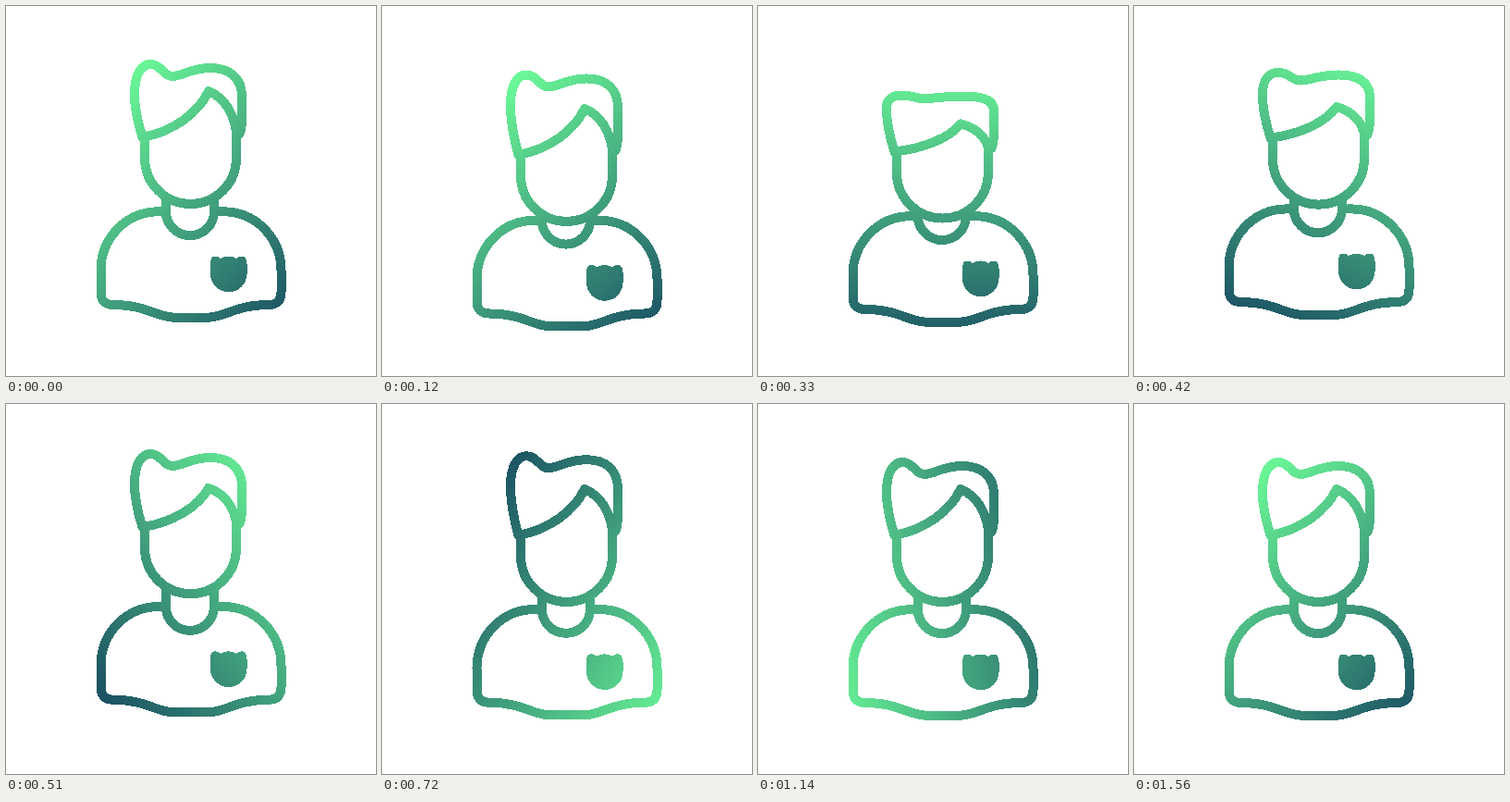
Recreate the animation shown at these times as an HTML page. Size 400 by 400 pixels, loop 3800 ms.

```html
<!DOCTYPE html>
<html lang="en">
<head>
<meta charset="utf-8">
<title>Player icon</title>
<style>
  html, body { margin: 0; width: 100%; height: 100%; overflow: hidden; background: #fff; }
  svg { display: block; width: 100vw; height: 100vh; shape-rendering: crispEdges; }
  .line { fill: none; stroke: url(#tint); stroke-width: 10; stroke-linecap: round; stroke-linejoin: round; }
</style>
</head>
<body>
<svg viewBox="0 0 400 400">
  <defs>
    <linearGradient id="tint" gradientUnits="userSpaceOnUse" x1="102" y1="106" x2="322" y2="326">
      <stop offset="0" stop-color="#6af797"/>
      <stop offset="1" stop-color="#1a4f63"/>
    </linearGradient>
  </defs>
  <g id="figure">
    <path class="line" d="M168,222.3H165C130,222.3 102.5,251 102.5,286V309Q102.5,323 116,323
      C152,323 163,336.7 182,336.7H218C237,336.7 248,323 284,323
      Q297.5,323 297.5,309V286C297.5,251 270,222.3 235,222.3H231"/>
    <path id="neck" class="line"/>
    <path id="face" class="line"/>
    <path id="hair" class="line"/>
    <path fill="url(#tint)" d="M221,279Q221,270.5 226,270.5Q230,270.5 232,273
      Q236,270.5 240.5,270.5T249,273Q251,270.5 255,270.5Q260.5,271 260.5,279
      V289.5A19.75,19.75 0 0 1 221,289.5Z"/>
  </g>
</svg>
<script>
const LOOP = 3800, STEP = 30, SPIN = 1560;
const ROOT = 142; // hairline, where the hair meets the face

const CROWN = "M147.5,142C143,128 139,112 139,95C139,73 147,63 156,63" +
  "C168,63 170,76 180,76C190,76 200,67 221,67C242,67 255,78 255,98" +
  "V120Q255,133 252.5,138";
const SWEEP = "L249.5,140C247,116 236,99 219,92C208,116 180,136 147.5,142Z";

const get = id => document.getElementById(id);
const ease = p => (1 - Math.cos(Math.PI * Math.min(Math.max(p, 0), 1))) / 2;

// 0 before a, 1 at the peak, 0 again after b
const hump = (t, a, peak, b) =>
  t < peak ? ease((t - a) / (peak - a)) : ease((b - t) / (b - peak));

// moves every y of a path, also after V
const warp = (path, fn) =>
  path.replace(/([,V])([\d.]+)/g, (_, mark, y) => mark + fn(+y).toFixed(2));

function draw(t) {
  const torso = 14.5 * hump(t, 0, 200, 450) - 3.5 * hump(t, 200, 450, 780);
  const head = 28 * hump(t, 0, 195, 540) - 9.5 * hump(t, 195, 540, 720) - torso;
  const stretch = 11.5 * hump(t, 0, 200, 300) + 8.5 * hump(t, 500, 610, 980);
  const squash = hump(t, 200, 330, 500);
  const fringe = hump(t, 200, 335, 640);

  const crown = y => y + head - stretch * Math.min((ROOT - y) / 50, 1)
    + .72 * squash * Math.max(88 - y, 0);
  const sweep = y => y + head + .4 * fringe * (ROOT - y);
  get("hair").setAttribute("d", warp(CROWN, crown) + warp(SWEEP, sweep));

  const jaw = 164.5 + head, nape = Math.min(206.6 + head, 222);
  get("face").setAttribute("d",
    `M150,${ROOT + head}V${jaw}A49.5,49.5 0 0 0 249,${jaw}V${140 + head}`);
  get("neck").setAttribute("d", `M172.8,${nape}V222A26.1,26.1 0 0 0 225,222V${nape}`);

  get("figure").setAttribute("transform", `translate(0 ${torso.toFixed(2)})`);
  const angle = 360 * ease((t / SPIN) ** .95);
  get("tint").setAttribute("gradientTransform", `rotate(${angle.toFixed(2)} 212 216)`);
}

const start = performance.now();
function tick() {
  const t = (performance.now() - start) % LOOP;
  draw(Math.floor(t / STEP) * STEP);
  requestAnimationFrame(tick);
}
draw(0);
requestAnimationFrame(tick);
</script>
</body>
</html>
```
